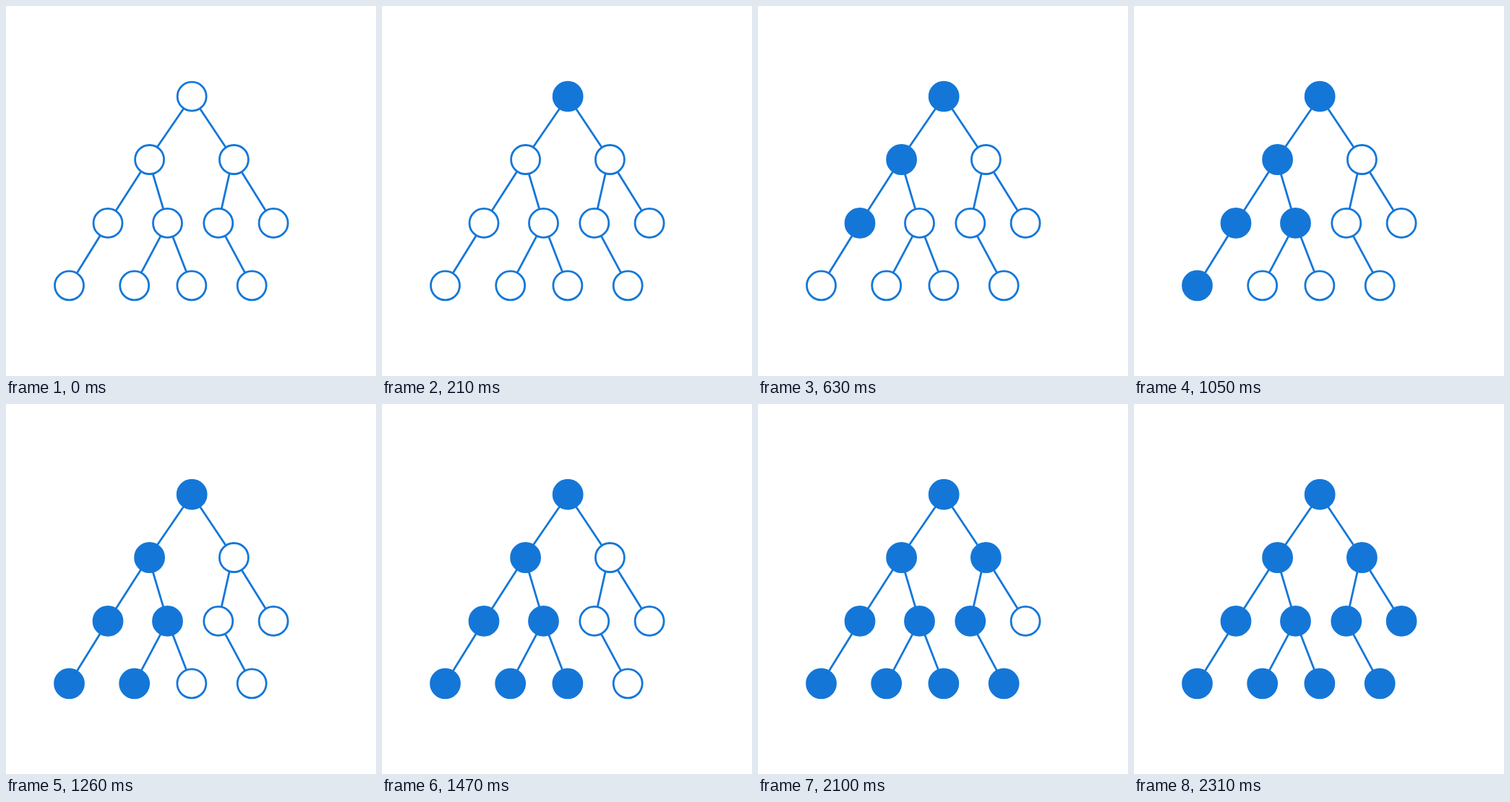
An HTML page with a canvas that plays this animation: 512x512 px, repeating every 2.52 s.

```html
<!DOCTYPE html>
<html lang="en">
<head>
<meta charset="utf-8">
<title>Depth-first traversal</title>
<style>
  html, body { margin: 0; width: 100%; height: 100%; overflow: hidden; background: #fff; }
  canvas { display: block; width: 512px; height: 512px; }
</style>
</head>
<body>
<canvas id="stage" width="512" height="512"></canvas>
<script>
const SIZE = 512;
const BLUE = '#1477d8';
const STEP = 210;
const RADIUS = 20;
const LINE = 2.8;
const ROWS = [125.2, 212.5, 300.4, 386.8];

// joint: x where the edges of a node meet; lean: shift of the upper end of its parent edge
const node = (x, kids = [], { joint = x, lean = 0 } = {}) => ({ x, kids, joint, lean });

const tree = node(257.2, [
  node(198.6, [
    node(141, [node(87.5)]),
    node(223.5, [node(177.7), node(256.9)])
  ], { joint: 197.4 }),
  node(315.4, [
    node(293.8, [node(340.2)], { lean: -1.9 }),
    node(370.1)
  ])
]);

// Visits a node before its children, left to right
function walk(item, visit, depth = 0, parent = null) {
  visit(item, depth, parent);
  item.kids.forEach(kid => walk(kid, visit, depth + 1, item));
}

let total = 0;
walk(tree, () => total++);
const loop = STEP * (total + 1);

const canvas = document.getElementById('stage');
const ctx = canvas.getContext('2d');
const scale = window.devicePixelRatio || 1;
canvas.width = canvas.height = SIZE * scale;
ctx.scale(scale, scale);

function drawEdge(item, depth, parent) {
  if (!parent) return;
  ctx.beginPath();
  ctx.moveTo(parent.joint + item.lean, ROWS[depth - 1]);
  ctx.lineTo(item.joint, ROWS[depth]);
  ctx.stroke();
}

function drawNode(item, depth, filled) {
  ctx.beginPath();
  ctx.arc(item.x, ROWS[depth], RADIUS, 0, Math.PI * 2);
  ctx.fillStyle = filled ? BLUE : '#fff';
  ctx.fill();
  ctx.stroke();
}

function draw(time) {
  const visited = Math.floor((time % loop) / STEP);
  let index = 0;
  ctx.fillStyle = '#fff';
  ctx.fillRect(0, 0, SIZE, SIZE);
  ctx.strokeStyle = BLUE;
  ctx.lineWidth = LINE;
  walk(tree, drawEdge);
  walk(tree, (item, depth) => drawNode(item, depth, index++ < visited));
}

const start = performance.now();
function tick() {
  draw(performance.now() - start);
  requestAnimationFrame(tick);
}
tick();
</script>
</body>
</html>
```
